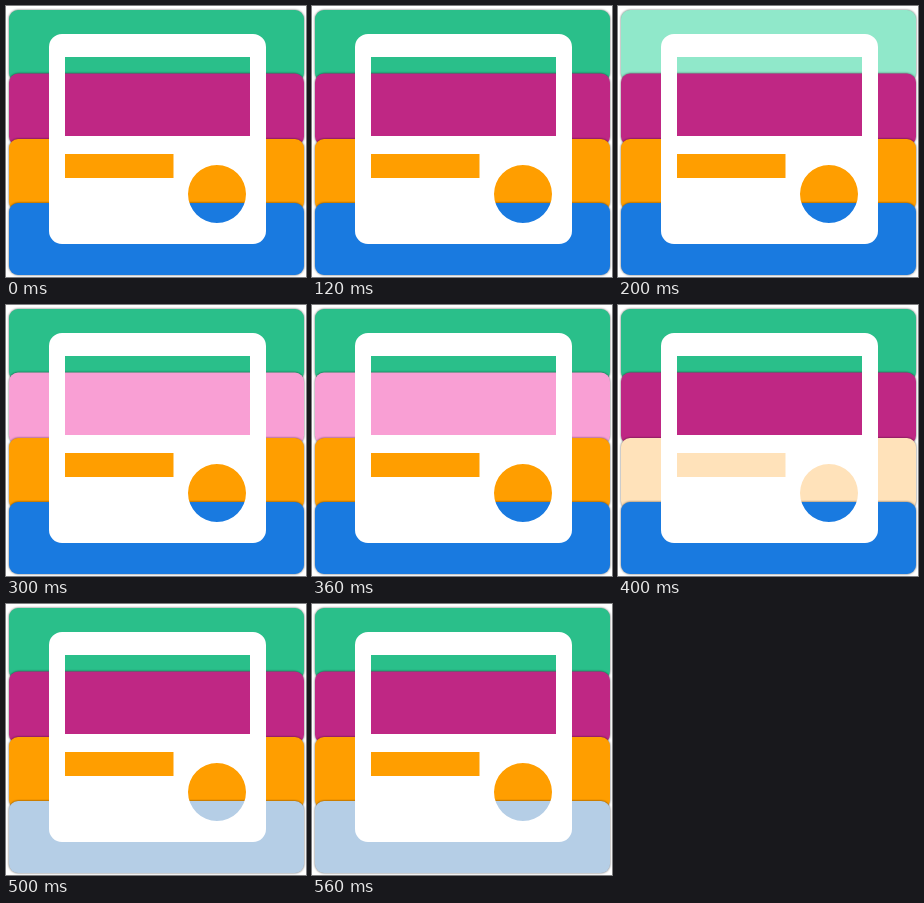
These frames come from a looping animation (300x271 px, 600 ms). An HTML page:

```html
<!DOCTYPE html>
<html>
<head>
<meta charset="utf-8">
<style>
html, body { margin: 0; width: 100%; height: 100%; overflow: hidden; background: #fff; }
svg { display: block; width: 300px; height: 271px; }
.layer { filter: drop-shadow(0 0 1.2px rgba(0, 0, 0, .6)); }
</style>
</head>
<body>
<svg viewBox="0 0 300 271">
  <g id="layers"></g>
  <path fill="#fff" fill-rule="evenodd" d="
    M56 28H247a13 13 0 0 1 13 13V225a13 13 0 0 1 -13 13H56a13 13 0 0 1 -13 -13V41a13 13 0 0 1 13 -13Z
    M59 51H244V130H59Z
    M59 148H167.500V172H59Z
    M182 188a29 29 0 0 1 58 0a29 29 0 0 1 -58 0Z"/>
</svg>
<script>
const layers = [
  { top: 4, color: '#2abf8a', light: '#90e8ca' },
  { top: 67.5, color: '#bf2784', light: '#f99fd4' },
  { top: 133, color: '#ff9e00', light: '#ffe2ba' },
  { top: 197, color: '#197ae0', light: '#b5cee6' },
];
const group = document.getElementById('layers');

for (const layer of layers) {
  const rect = document.createElementNS('http://www.w3.org/2000/svg', 'rect');
  const attrs = { class: 'layer', x: 3, y: layer.top, width: 295, height: 72, rx: 9 };
  for (const name in attrs) rect.setAttribute(name, attrs[name]);
  layer.rect = group.appendChild(rect);
}

// One layer at a time lights up, top to bottom, after a 200 ms rest.
function draw() {
  const lit = Math.floor((performance.now() % 600) / 100) - 2;
  layers.forEach((layer, i) => {
    layer.rect.setAttribute('fill', i === lit ? layer.light : layer.color);
  });
  requestAnimationFrame(draw);
}
draw();
</script>
</body>
</html>
```
